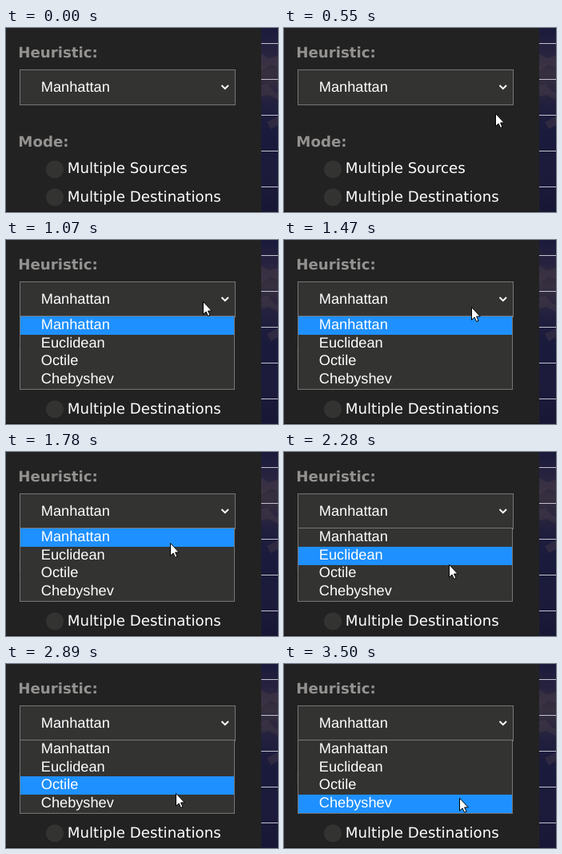
Write an HTML page that moves like this. It is 340 px wide and 231 px high and loops after 3.53 s.

```html
<!DOCTYPE html>
<html lang="en">
<head>
<meta charset="utf-8">
<title>Heuristic menu</title>
<style>
html, body { margin: 0; width: 100%; height: 100%; overflow: hidden; background: #222; }
svg { display: block; width: 340px; height: 231px; }
text { fill: #fff; text-rendering: geometricPrecision; white-space: pre; }
.title { font: bold 18.2px "DejaVu Sans", sans-serif; fill: #949290; }
.label { font: 18.2px "DejaVu Sans", sans-serif; }
.item { font: 18.2px "Liberation Sans", Arial, sans-serif; }
.box { fill: #333432; stroke: #767676; }
</style>
</head>
<body>
<svg viewBox="0 0 340 231">
  <defs>
    <linearGradient id="sky" x2="0" y2="1">
      <stop offset="0" stop-color="#1b1a3c"/>
      <stop offset=".14" stop-color="#28233f"/>
      <stop offset=".25" stop-color="#37303f"/>
      <stop offset=".42" stop-color="#211f3e"/>
      <stop offset=".6" stop-color="#191a3c"/>
      <stop offset=".8" stop-color="#1d1b3b"/>
      <stop offset="1" stop-color="#171735"/>
    </linearGradient>
  </defs>
  <rect width="340" height="231" fill="#222"/>
  <rect x="319" width="21" height="231" fill="url(#sky)"/>
  <g fill="#4a3f49" opacity=".4">
    <path d="M319 32L328 38L340 35V49L330 46L319 54Z"/>
    <path d="M319 72L327 70L333 78L340 82V90L328 84L319 86Z"/>
    <path d="M326 118L340 111V122L331 127Z"/>
  </g>
  <path id="grid" stroke="#c3c2cf"/>
  <rect y="230" width="319" height="1" fill="#171214"/>

  <text class="title" x="15.3" y="37">Heuristic:</text>
  <text class="title" x="15.3" y="149">Mode:</text>
  <g fill="#333432">
    <circle cx="61" cy="177.5" r="11"/>
    <circle cx="61" cy="212.5" r="11"/>
  </g>
  <text class="label" x="76.8" y="182">Multiple Sources</text>
  <text class="label" x="76.8" y="218">Multiple Destinations</text>

  <rect class="box" x="17.5" y="52.5" width="269" height="44"/>
  <text class="item" x="43.8" y="80">Manhattan</text>
  <path d="M269.5 72L273.8 76.2L278 72" fill="none" stroke="#fff" stroke-width="2"/>

  <g id="menu">
    <rect class="box" x="17.5" y="95.5" width="268" height="92"/>
    <rect id="mark" x="18" width="267" height="23" fill="#1e90ff"/>
  </g>
  <path id="cursor" d="M.5 .5V16.3L4.1 13L6.6 18.4L9 17.3L6.6 12H11.3Z" fill="#fff" stroke="#000" stroke-width="1"/>
</svg>
<script>
const LOOP = 3530, OPEN = 960, TOP = 96, PITCH = 22.7;
const $ = id => document.getElementById(id);
const menu = $('menu'), mark = $('mark'), cursor = $('cursor');

// time, x, y of the pointer tip
const path = [
  [0, 320, 232], [280, 320, 231], [420, 287, 158], [550, 264, 107],
  [680, 253, 86], [810, 247, 79], [850, 246, 77], [1350, 246, 77],
  [1560, 222, 93], [1780, 205, 114], [1870, 205, 125], [1900, 205, 125],
  [2280, 206, 141], [2370, 207, 146], [2450, 207, 146], [2500, 208, 150],
  [2690, 208, 150], [2890, 212, 162], [3080, 211, 168], [3430, 211, 168],
  [3500, 219, 168], [LOOP, 219, 168]
];

const slope = (i, k) =>
  path[i] && path[i + 1] ? (path[i + 1][k] - path[i][k]) / (path[i + 1][0] - path[i][0]) : 0;

// monotone tangent: no overshoot around rests
function tangent(i, k) {
  const a = slope(i - 1, k), b = slope(i, k);
  return a * b > 0 ? 2 * a * b / (a + b) : 0;
}

function at(t, k) {
  let i = 0;
  while (i < path.length - 2 && t >= path[i + 1][0]) i++;
  const [p, q] = [path[i], path[i + 1]];
  const h = q[0] - p[0], u = (t - p[0]) / h, v = 1 - u;
  return p[k] * v * v * (1 + 2 * u) + q[k] * u * u * (3 - 2 * u)
    + h * u * v * (v * tangent(i, k) - u * tangent(i + 1, k));
}

$('grid').setAttribute('d', [19.5, 64.5, 109.5, 154.5, 199.5].map(y => `M319 ${y}H340`).join(''));

['Manhattan', 'Euclidean', 'Octile', 'Chebyshev'].forEach((name, i) => {
  const text = document.createElementNS('http://www.w3.org/2000/svg', 'text');
  text.setAttribute('class', 'item');
  text.setAttribute('x', 43.8);
  text.setAttribute('y', Math.round(112 + i * PITCH));
  text.textContent = name;
  menu.append(text);
});

function draw(t) {
  const x = Math.round(at(t, 1)), y = Math.round(at(t, 2));
  cursor.setAttribute('transform', `translate(${x} ${y})`);
  menu.style.display = t >= OPEN ? '' : 'none';
  const row = Math.max(0, Math.min(3, Math.floor((y - TOP) / PITCH)));
  mark.setAttribute('y', Math.round(TOP + row * PITCH));
}

const start = performance.now();
function tick() {
  draw((performance.now() - start) % LOOP);
  requestAnimationFrame(tick);
}
draw(0);
requestAnimationFrame(tick);
</script>
</body>
</html>
```
